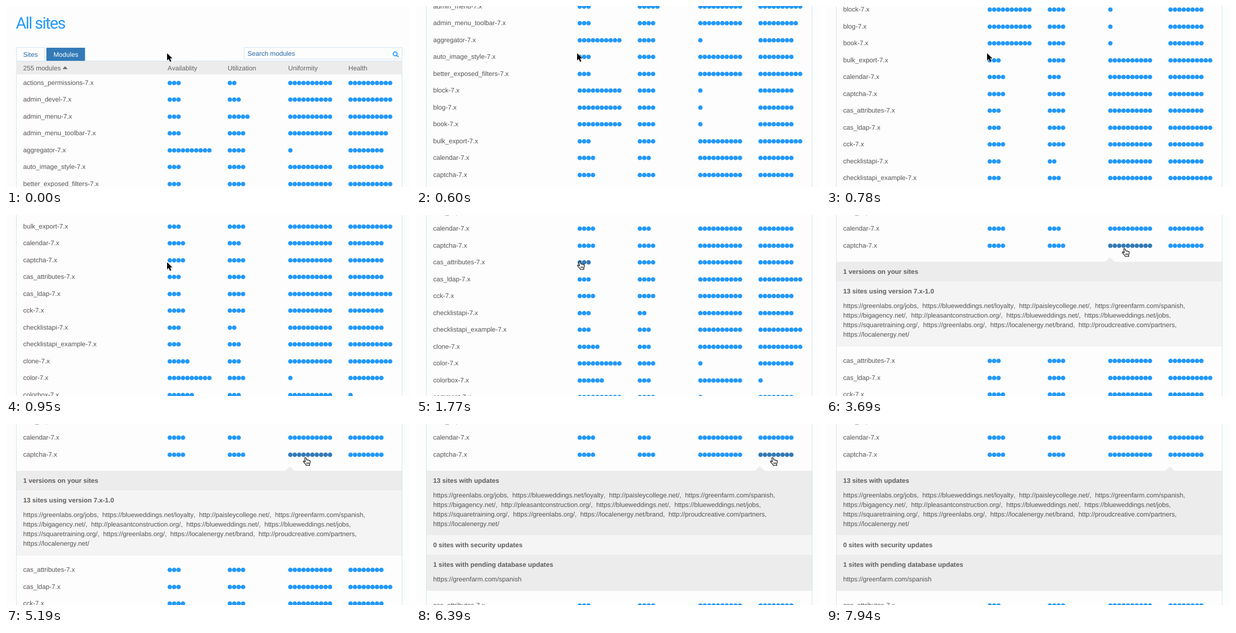
Write an HTML page that moves like this. It is 800x360 px and loops after 9820 ms.

```html
<!DOCTYPE html>
<html lang="en">
<head>
<meta charset="utf-8">
<title>All sites</title>
<style>
html, body { margin: 0; width: 100%; height: 100%; overflow: hidden; background: #fdfdfd; }
svg { display: block; width: 800px; height: 360px; }
text {
  font: 13px "Liberation Sans", Arial, sans-serif;
  font-kerning: none;
  text-rendering: geometricPrecision;
  white-space: pre;
  fill: #555;
}
.title { font: 32px Roboto, sans-serif; letter-spacing: -1.7px; fill: #2399fa; }
.link { fill: #2467a6; }
.light { fill: #fff; }
.label { fill: #636363; }
.bold { font-weight: bold; fill: #5e5e5e; }
.dots { fill: #2399fa; }
.dots.on { fill: #337ab7; }
.edge { fill: none; stroke: #cbe4f5; }
</style>
</head>
<body>
<svg id="stage" viewBox="0 0 800 360"></svg>
<script>
const LOOP = 9820;
const COLS = [320, 439, 558.8, 678];
const PITCH = 33.5;
const SCROLL_END = 494;

// Name, then one base-36 digit per column for the number of dots.
const MODULES = `actions_permissions 32aa
admin_devel 33aa
admin_menu 35aa
admin_menu_toolbar 34a9
aggregator a418
auto_image_style 34a8
better_exposed_filters 34aa
block a418
blog a418
book a418
bulk_export 34aa
calendar 43a8
captcha 44a8
cas_attributes 34a8
cas_ldap 34aa
cck 44a8
checklistapi 32a8
checklistapi_example 33aa
clone 53aa
color a418
colorbox 63a1
comment a418`.split("\n").map(line => line.split(" "));

const OPEN_ROW = 12;

const SITES = [
  "https://greenlabs.org/jobs,  https://blueweddings.net/loyalty,  http://paisleycollege.net/,  https://greenfarm.com/spanish,",
  "https://bigagency.net/,  http://pleasantconstruction.org/,  https://blueweddings.net/,  https://blueweddings.net/jobs,",
  "https://squaretraining.org/,  https://greenlabs.org/,  https://localenergy.net/brand,  http://proudcreative.com/partners,",
  "https://localenergy.net/"
];

const stage = document.getElementById("stage");

function add(parent, tag, attrs = {}, content = "") {
  const el = document.createElementNS("http://www.w3.org/2000/svg", tag);
  for (const key in attrs) el.setAttribute(key, attrs[key]);
  el.textContent = content;
  parent.appendChild(el);
  return el;
}
const group = (parent = stage) => add(parent, "g");
const write = (parent, x, y, content, cls = "") => add(parent, "text", { x, y, class: cls }, content);
const box = (parent, x, y, width, height, fill) => add(parent, "rect", { x, y, width, height, fill });
const move = (el, x, y) => el.setAttribute("transform", `translate(${x} ${y})`);
const show = (el, on) => el.setAttribute("visibility", on ? "visible" : "hidden");

function buildHead() {
  const g = group();
  write(g, 19.5, 45, "All sites", "title");
  add(g, "path", { class: "edge", d: "M20.5 1100V82.5H76.5V109M784.5 109V1100" });
  box(g, 80, 83, 76.5, 26, "#337ab7");
  write(g, 34, 101, "Sites", "link");
  write(g, 94, 101, "Modules", "light");
  add(g, "path", { class: "edge", d: "M471.5 82.5H784.5V105.5H471.5Z" });
  write(g, 478.3, 99, "Search modules", "link");
  add(g, "path", {
    d: "M774.5 95.2a3.9 3.9 0 1 1-7.8 0a3.9 3.9 0 1 1 7.8 0M773.6 98.2L777 101.4",
    fill: "none", stroke: "#2399fa", "stroke-width": 1.9
  });
  box(g, 20, 109, 765, 27, "#ececec");
  add(g, "path", { class: "edge", d: "M20 109.5H785" });
  write(g, 34, 128, "255 modules", "label");
  add(g, "path", { d: "M112 125.5L117 120L122 125.5Z", fill: "#666" });
  ["Availablity", "Utilization", "Uniformity", "Health"]
    .forEach((name, i) => write(g, COLS[i], 128, name, "label"));
  return g;
}

function buildRow([name, counts]) {
  const g = group();
  write(g, 34, 4, name + "-7.x");
  const cells = COLS.map((x, i) => {
    const cell = add(g, "g", { class: "dots" });
    for (let k = 0; k < parseInt(counts[i], 36); k++) {
      add(cell, "circle", { cx: x + 4.3 + 8.72 * k, cy: 0.2, r: 4.35 });
    }
    return cell;
  });
  return { g, cells };
}

// Each section: top, height, fill, heading, lines of links.
function buildPanel(tip, sections) {
  const g = group();
  add(g, "path", { d: `M${tip - 10} 93.5L${tip} 84L${tip + 10} 93.5Z`, fill: "#ececec" });
  for (const [top, height, fill, heading, lines] of sections) {
    box(g, 21, top, 763, height, fill);
    write(g, 34, top + 24, heading, "bold");
    lines.forEach((line, i) => write(g, 34, top + 53 + 19 * i, line));
  }
  return g;
}

const head = buildHead();
const rows = MODULES.map(buildRow);
const versions = buildPanel(562, [
  [93, 39, "#ececec", "1 versions on your sites", []],
  [132, 129, "#f4f4f4", "13 sites using version 7.x-1.0", SITES]
]);
box(versions, 21, 260, 763, 1, "#ebebeb");
const updates = buildPanel(681, [
  [93, 128, "#ececec", "13 sites with updates", SITES],
  [221, 39, "#f5f5f5", "0 sites with security updates", []],
  [260, 72, "#ececec", "1 sites with pending database updates", ["https://greenfarm.com/spanish"]]
]);

// Both pointers have their hot spot at 0,0.
const arrow = add(stage, "path", {
  d: "M0 0V14.2L3.3 11.2L5.8 17L8.4 15.9L5.9 10.3H10.5Z",
  fill: "#000", stroke: "#fff", "stroke-width": 1.2, "paint-order": "stroke"
});
const hand = group();
add(hand, "path", {
  d: "M-1.4.6C-.8-.6.8-.5 1.3.8L2.6 4.6C3.3 4 4.4 4.1 4.9 5C5.7 4.4 6.8 4.7 7.2 5.7C8.3 5.3 9.3 6 9.4 7.2C9.6 9.3 9.4 11 8.3 12.6V15.5H1.6C1 13.4-.7 12-1.8 10.6L-4.1 8.2C-4.9 7-3.4 5.9-2.2 6.8L-.4 8.2Z",
  fill: "#fff", stroke: "#000", "stroke-width": 1.2, "stroke-linejoin": "round"
});
add(hand, "path", { d: "M2.6 9.3V13M4.6 9.3V13M6.6 9.3V13", stroke: "#000", "stroke-width": 0.9 });

const smooth = u => u * u * (3 - 2 * u);
const mix = (a, b, u) => a + (b - a) * u;
// Whole steps reached since start, the first one counting as 1.
const steps = (t, start, size, count) =>
  Math.max(0, Math.min(count, Math.floor((t - start) / size) + 1));

// A flick: quick start, then a long slow-down.
function scrollAt(t) {
  const k = steps(t, 480, 58.3, 13);
  return k <= 3
    ? 219 * (k / 3) ** 1.3
    : SCROLL_END - 275 * ((13 - k) / 10) ** 2.46;
}

function pointerAt(t) {
  if (t >= 7880) return [784, 96];
  const first = smooth(steps(t, 1770, 60, 12) / 12);
  const second = smooth((steps(t, 5190, 60, 7) / 7) ** 1.3);
  return [mix(mix(318.5, 591, first), 706, second), mix(94, 67, first)];
}

// Row and column of the dots under the pointer.
function hoverAt(t, x, y) {
  if (t < 1420 || t >= 7880) return null;
  if (x < 348 && y > 88) return [13, 0];
  if (y > 70) return null;
  if (x > 557 && x < 648) return [OPEN_ROW, 2];
  if (x > 677 && x < 749) return [OPEN_ROW, 3];
  return null;
}

const gapAt = t => t < 3210 ? 0 : t < 3270 ? 181 : t < 6390 ? 196 : 267;

function render(t) {
  const scroll = Math.round(scrollAt(t));
  const gap = gapAt(t);
  const [x, y] = pointerAt(t);
  const hover = hoverAt(t, x, y);

  move(head, 0, -scroll);
  rows.forEach(({ g, cells }, i) => {
    move(g, 0, Math.round(152.5 + PITCH * i - scroll) + (i > OPEN_ROW ? gap : 0));
    cells.forEach((cell, c) =>
      cell.classList.toggle("on", !!hover && hover[0] === i && hover[1] === c));
  });

  show(versions, t >= 3270 && t < 6390);
  versions.setAttribute("opacity", t < 3690 ? 0.9 : 1);
  show(updates, t >= 6390);

  const pointing = !!hover && t >= 1470;
  show(hand, pointing);
  show(arrow, !pointing && t < 7940);
  move(hand, Math.round(x), Math.round(y));
  move(arrow, Math.round(x), Math.round(y));
}

let start;
function tick(now) {
  start ??= now;
  render((now - start) % LOOP);
  requestAnimationFrame(tick);
}
render(0);
requestAnimationFrame(tick);
</script>
</body>
</html>
```
